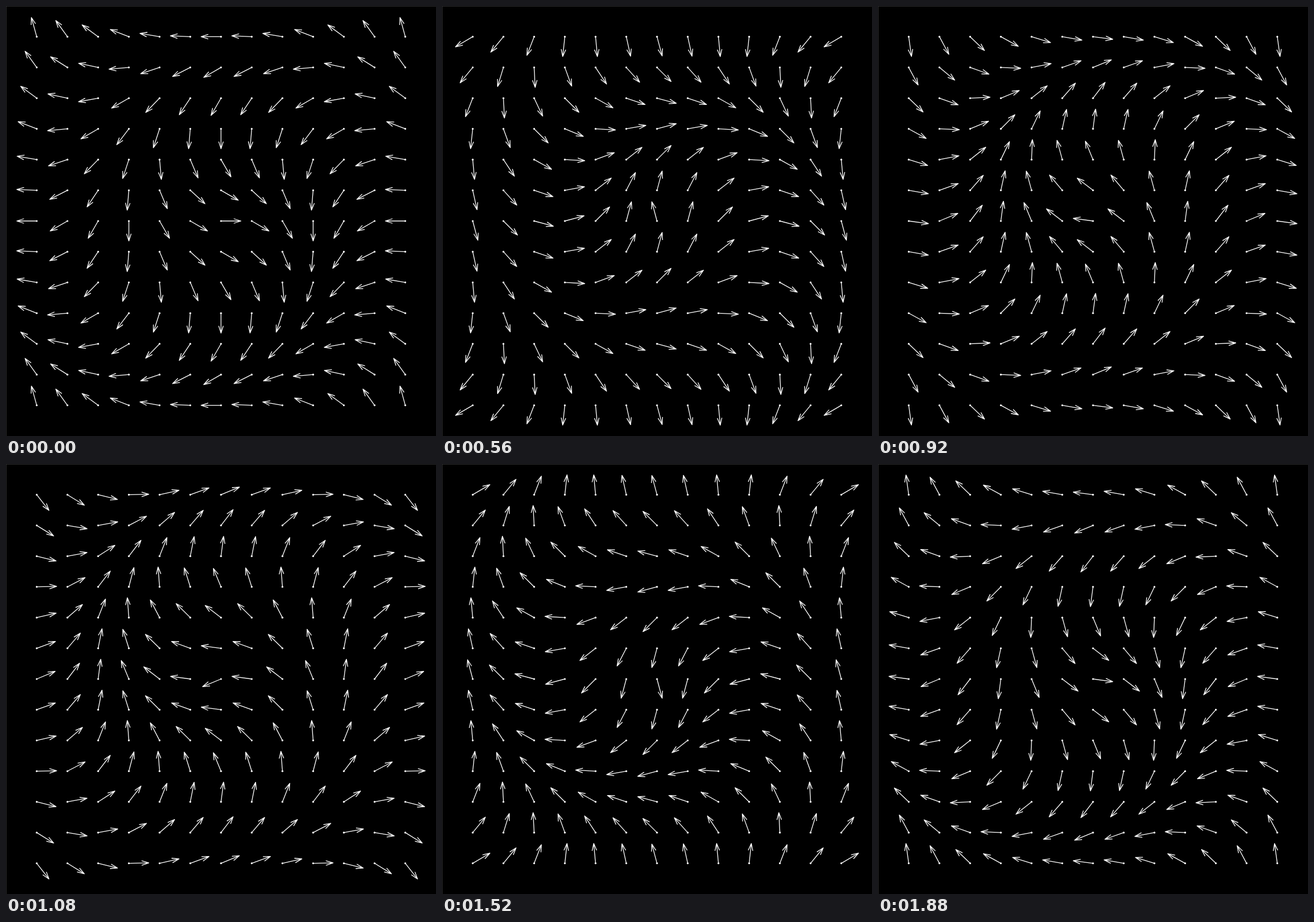
An HTML page with a canvas for the animation above (1.92 s loop, 748 by 748 pixels).

```html
<!DOCTYPE html>
<html>
<head>
<meta charset="utf-8">
<style>
html, body { margin: 0; width: 100%; height: 100%; overflow: hidden; background: #000; }
canvas { display: block; }
</style>
</head>
<body>
<canvas id="stage" width="748" height="748"></canvas>
<script>
const ctx = document.getElementById('stage').getContext('2d');
const SIZE = 748, LOOP = 1920, STEP = 40;
const HALF = 6, GAP = SIZE / 14;
const LENGTH = 34.7, BARB = 12.5, SPREAD = 4;

function arrow(x, y, angle) {
  ctx.save();
  ctx.translate(x, y);
  ctx.beginPath();
  ctx.arc(0, 0, 1.6, 0, 2 * Math.PI);
  ctx.fill();
  ctx.rotate(angle);
  ctx.beginPath();
  ctx.moveTo(0, 0);
  ctx.lineTo(LENGTH, 0);
  ctx.moveTo(LENGTH - BARB, -SPREAD);
  ctx.lineTo(LENGTH, 0);
  ctx.lineTo(LENGTH - BARB, SPREAD);
  ctx.stroke();
  ctx.restore();
}

function draw(ms) {
  const phase = Math.floor(ms / STEP) * STEP / LOOP * 2 * Math.PI;
  ctx.fillStyle = '#000';
  ctx.fillRect(0, 0, SIZE, SIZE);
  ctx.fillStyle = '#2a2a2a';
  ctx.fillRect(0, 0, SIZE, 1);
  ctx.fillRect(0, 0, 1, SIZE);
  ctx.fillStyle = ctx.strokeStyle = '#fff';
  ctx.lineWidth = 1.3;
  ctx.lineJoin = 'round';
  // Each grid step away from the centre lags by 30 degrees.
  for (let row = -HALF; row <= HALF; row++)
    for (let col = -HALF; col <= HALF; col++)
      arrow(SIZE / 2 + col * GAP, SIZE / 2 + row * GAP,
        Math.hypot(col, row) * Math.PI / 6 - phase);
}

const start = performance.now();
function tick() {
  draw((performance.now() - start) % LOOP);
  requestAnimationFrame(tick);
}
tick();
</script>
</body>
</html>
```
